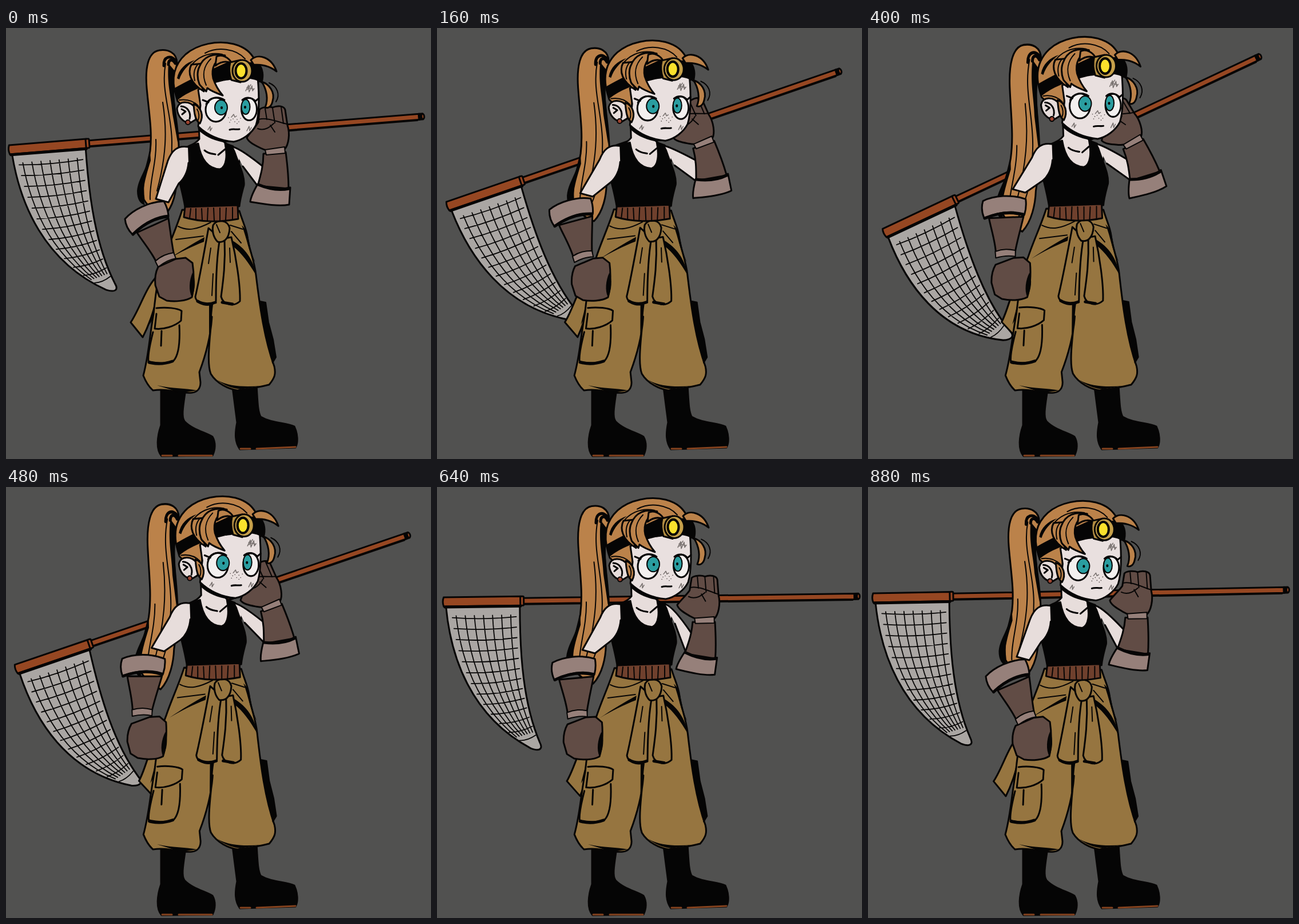
These frames come from a looping animation (743x754 px, 0.96 s). An HTML page:

```html
<!DOCTYPE html>
<html lang="en">
<head>
<meta charset="utf-8">
<title>Explorer with a net</title>
<style>
html, body { margin: 0; width: 100%; height: 100%; overflow: hidden; background: #515150; }
svg { display: block; width: 743px; height: 754px; stroke: #060505; stroke-width: 3; stroke-linejoin: round; stroke-linecap: round; fill: none; }
.hair { fill: #bb824a; }
.skin { fill: #e7dddb; }
.face { fill: #e9e0df; }
.cloth { fill: #967540; }
.glove { fill: #614c45; }
.cuff { fill: #96807a; }
.wood { fill: #964722; }
.ink { fill: #050505; }
.thin { stroke-width: 2; }
.fat { stroke-width: 5; }
.solid { fill: #050505; stroke: none; }
.smudge { stroke: #77706e; stroke-width: 1.5; }
</style>
</head>
<body>
<svg viewBox="0 0 743 754">
  <g id="pole">
    <g id="net">
      <path fill="#aaa6a3" d="M5 9C12 95 45 200 150 258C165 264 172 260 166 248C138 180 133 95 134 9Z"/>
      <path id="mesh" stroke-width="1.8"/>
    </g>
    <path class="wood" d="M138 -5L720 -5Q727 0 720 5L138 5Z"/>
    <path d="M140 6H716"/>
    <path class="wood" d="M1 -8L136 -8V8H1Q-2 0 1 -8Z"/>
    <path class="fat" d="M3 9H135"/>
    <rect class="wood" x="135" y="-8" width="6" height="16" rx="2"/>
    <path class="ink" d="M719 -5H726V5H719Z"/>
    <ellipse class="wood" cx="726" cy="0" rx="2.5" ry="4.5"/>
  </g>

  <g id="tail">
    <path class="hair" d="M299 62C299 42 282 37 268 39C248 42 243 70 246 105C250 150 256 180 252 215C247 245 236 262 241 300C250 315 265 324 277 328C293 312 298 285 298 265C302 240 302 220 302 205C300 160 290 130 293 95Z"/>
    <path class="solid" d="M252 215C246 250 231 262 229 285C229 300 235 308 243 310C237 290 241 270 253 232Z"/>
    <path class="solid" d="M284 62C281 100 289 120 291 150L300 200C302 160 289 120 295 75Z"/>
    <path class="thin" d="M279 62C270 110 290 150 290 200S285 270 270 304M262 195C264 235 250 270 252 300M274 130C282 180 280 225 264 285"/>
    <path class="fat" d="M276 66C275 50 288 46 297 58M284 64C284 55 291 53 296 62"/>
  </g>

  <g class="ink">
    <path d="M271 632L314 632C310 660 306 680 312 688C325 702 350 708 361 715C367 725 366 738 361 748L272 749C262 738 264 715 271 695Z"/>
    <path d="M396 628L438 625C440 655 440 670 445 680C465 692 490 690 504 697C510 710 511 725 506 734L409 737C400 725 400 710 404 690Z"/>
    <path stroke="#85431f" d="M273 748L290 748M302 748L360 748M410 736L427 736M438 736L506 733"/>
  </g>

  <g id="lower">
    <path id="flap" class="cloth" d="M268 430C245 450 235 490 218 515L239 541C250 520 256 500 262 480Z"/>
    <path class="solid" d="M251 519L261 478L263 498Z"/>
    <path class="cloth" d="M308 318C300 345 286 375 278 400C266 430 262 460 258 500C250 545 250 570 240 608C244 618 250 628 257 634C285 630 300 640 325 638C335 637 340 630 340 620L338 602C350 570 358 540 360 505C354 560 352 590 358 605C368 622 390 632 405 634C430 630 445 628 460 624C470 612 472 605 469 592C452 545 444 490 437 432C434 405 424 385 422 365C420 350 414 340 408 320Z"/>
    <path class="ink thin" d="M444 478L454 480L459 515L467 545L472 576L466 586C464 570 455 540 450 515Z"/>
    <path d="M263 490C280 488 300 490 307 495L306 512C295 522 275 528 260 526L263 500M257 532C250 560 248 575 249 583C265 588 285 586 293 582C304 570 304 540 303 520M272 530L271 556"/>
    <path class="fat" d="M250 585C265 589 280 587 291 583"/>
    <path class="solid" d="M355 484L362 484C359 505 360 525 355 536ZM264 625C290 631 315 630 334 634L302 639C290 632 278 630 264 625ZM370 616C390 628 420 628 446 626L410 632C392 630 380 624 370 616Z"/>
    <path class="solid" d="M283 405C305 390 325 378 347 366L346 374C325 382 305 392 283 405ZM396 372C418 385 432 404 438 434C424 410 412 394 397 382ZM412 345C428 360 422 380 436 410C424 394 422 370 412 345Z"/>
    <path class="thin" d="M301 347C318 356 335 352 358 340M297 370L345 364M392 345L414 352M394 356L411 376"/>
    <path class="cloth" d="M354 350C345 400 338 440 331 470C332 484 358 490 367 478C367 440 368 400 374 368Z"/>
    <path class="cloth" d="M382 368C384 410 380 440 376 470C380 485 398 488 409 478C410 450 402 400 394 366Z"/>
    <path class="cloth" d="M362 345C370 333 388 336 391 350C390 370 380 376 370 374C362 366 360 354 362 345Z"/>
    <path class="thin" d="M368 344L374 358M358 385L354 412M362 430L360 468M391 385L392 410"/>
    <path class="fat" d="M335 478C345 484 355 484 366 480M378 480L396 483"/>
  </g>

  <g class="upper">
    <path class="skin" d="M337 160L338 194C332 202 325 204 314 209L320 270H400L410 225C400 207 388 208 378 196L376 180Z"/>
    <path d="M347 214C354 220 360 220 366 221M383 212L371 222"/>
    <path class="ink" d="M317 208L336 202C340 225 350 246 374 247C386 243 387 222 383 202L397 207C402 230 418 255 416 275C412 290 409 300 408 312L313 313C310 295 306 280 303 268C318 260 322 235 317 208Z"/>
    <path fill="#6f402d" d="M313 313L405 310L406 334C375 340 340 340 311 331Z"/>
    <path class="thin" d="M323 316L321 333M332 316V334M342 316L343 336M353 315L352 337M363 315L364 337M374 315V337M385 315L384 336M396 314V334"/>
  </g>

  <path id="leftArm" class="skin"/>
  <g id="leftGlove">
    <path class="glove" d="M450 220L489 217C492 240 494 260 494 281L440 276C446 255 450 240 450 220Z"/>
    <path class="cuff" d="M440 273C460 281 480 283 497 279L495 309C475 313 445 307 427 304C428 295 436 280 440 273Z"/>
    <path class="fat" d="M441 274C460 282 480 284 495 281"/>
    <path class="glove" d="M443 143C447 138 460 137 466 139C475 135 486 136 488 143L492 170C497 185 494 205 487 212C470 218 455 215 445 210C435 205 424 200 421 192C425 185 435 175 441 165Z"/>
    <path class="thin" d="M453 141L456 160M466 140L470 166M481 138L485 167M442 160C455 155 480 166 491 168M440 176C450 180 460 175 468 167M462 170L470 182"/>
    <path class="cuff thin" d="M453 213L487 208L488 219L455 222Z"/>
  </g>

  <path id="rightArm" class="skin"/>
  <g id="rightFist">
    <path class="glove" d="M266 418L297 404L314 402L326 411C329 430 329 455 325 471C314 478 295 479 281 477L268 470L261 450C260 440 261 428 266 418Z"/>
    <path class="solid" d="M326 428C332 440 331 458 325 471C319 460 320 442 326 428Z"/>
  </g>
  <g id="rightGlove">
    <path class="glove" d="M229 358L284 333C288 360 290 380 294 398L264 412C255 392 240 375 229 358Z"/>
    <path class="cuff thin" d="M261 408C272 398 282 395 293 393L297 403C285 405 275 411 266 418Z"/>
    <path class="cuff" d="M208 334C222 318 250 304 276 303C280 310 283 318 284 328C262 330 240 342 221 361C214 354 209 345 208 334Z"/>
    <path class="fat" d="M222 361C240 343 262 332 283 330"/>
  </g>

  <g class="upper">
    <path class="hair" d="M297 118C288 88 294 64 314 46C335 28 370 21 398 28C420 34 428 44 434 54L446 92L340 132L337 160C326 145 310 138 300 128Z"/>
    <path class="face" d="M336 108L340 135L336 172C352 187 374 197 398 199C414 196 430 184 437 170C443 150 443 120 440 86C410 80 370 88 336 108Z"/>
    <path class="solid" d="M335 170C352 187 374 196 398 199L380 200C360 196 345 188 336 178Z"/>
    <path class="skin" d="M331 140C322 127 302 126 299 141C300 155 310 166 322 166L332 160Z"/>
    <path d="M306 137C317 137 324 148 321 159M307 142L314 146L308 151"/>
    <circle cx="318" cy="165" r="4" fill="#9e4430" class="thin"/>
    <path class="hair" d="M328 133C342 138 346 154 339 167C331 162 329 150 328 133Z"/>
    <path class="thin" d="M303 126C316 124 328 128 336 136M334 142C338 148 338 156 336 161"/>

    <ellipse cx="367" cy="143" rx="18" ry="21" fill="#f3f0ef"/>
    <ellipse cx="425" cy="142" rx="13.5" ry="19.5" fill="#f3f0ef"/>
    <g fill="#2a9da0" class="thin">
      <ellipse cx="376" cy="139" rx="11" ry="13"/>
      <ellipse cx="419" cy="138" rx="7.5" ry="13"/>
    </g>
    <path stroke-width="4" d="M377 139v1M418 138v1"/>
    <path d="M344 126L354 130M350 133C355 122 370 118 382 126M413 126C420 120 430 121 436 128L442 123"/>
    <path d="M391 178C397 176 402 178 408 177"/>
    <path stroke="#4a4240" stroke-width="1.6" d="M389 157h0M393 161h0M391 165h0M397 159h0M400 164h0M404 160h0M407 164h0M410 158h0M404 167h0"/>
    <path class="smudge" d="M419 110L424 100L425 112L430 101L431 110L434 106M421 104L433 107M422 108L428 99M353 178L357 172L357 180L360 175M421 180L425 172L426 180L429 174M394 156L398 151L400 156L403 154"/>

    <path class="ink" d="M296 106C320 92 350 78 390 60L440 62C450 70 450 85 447 95C430 82 405 88 380 91C350 98 320 108 300 124Z"/>
    <path class="hair" d="M324 64C317 78 322 97 346 111C338 95 337 80 346 62Z"/>
    <path class="hair" d="M338 68C345 50 362 43 383 48C366 54 358 70 362 88C366 100 372 110 379 118C368 114 358 110 352 105L350 111C346 106 340 102 338 98C334 88 334 76 338 68Z"/>
    <path class="hair" d="M368 50C378 45 390 52 395 62C384 56 374 60 366 66Z"/>
    <path class="thin" d="M350 100C342 82 346 66 358 54M330 92C327 80 330 70 335 64M322 68C332 53 352 41 378 46M348 44C370 32 402 36 418 54"/>
    <path class="solid" d="M299 88C302 72 314 61 330 56C318 65 308 75 303 90Z"/>
    <path class="hair" d="M428 56C440 44 464 50 473 76C460 66 448 64 433 64Z"/>
    <path class="hair" d="M447 94C460 98 471 112 466 128C464 138 458 141 453 139C459 125 456 108 447 94Z"/>
    <path class="thin" d="M460 96C474 102 480 116 472 129"/>

    <path fill="#b28d42" d="M392 60L410 56V95L394 91Q388 75 392 60Z"/>
    <ellipse cx="413" cy="75" rx="17" ry="19" fill="#c6a04a"/>
    <ellipse cx="411" cy="75" rx="9.5" ry="13" fill="#fae12c" stroke-width="4"/>
  </g>
</svg>
<script>
const STEP = 80, STEPS = 12;
// Each track holds the value at step 0, then at steps 1, 3, 5, 7, 9 and 11.
const tracks = {
  poleX: [5, 8, 28, 28, 7, 16, 8],
  poleY: [213, 264, 352, 359, 264, 155, 194],
  poleTurn: [-4.6, -11.9, -24.8, -25.2, -10.4, 6.1, -1.1],
  netLag: [0, 0, .1, .16, .02, 0, 0],
  rise: [0, .15, .6, 1, .75, .4, .1],
  cuffX: [246, 239, 231, 237, 239, 238, 244],
  cuffY: [332, 328, 316, 315, 315, 322, 330],
  cuffTurn: [0, 3, 16, 22, 25, 12, 1],
  fistX: [0, -12, -38.5, -44.5, -48.5, -27, -8],
  handX: [471, 468, 466, 464, 466, 470, 471],
  handY: [216, 209, 196, 200, 219, 244, 226],
  handTurn: [0, -8.4, -21, -22.5, -6, 11, 4]
};

// Known steps are read directly; the even ones lie on a cubic through their neighbours.
function valueAt(track, step) {
  const odd = k => track[((k + STEPS) % STEPS + 1) / 2];
  if (step === 0) return track[0];
  if (step % 2) return odd(step);
  return (9 * (odd(step - 1) + odd(step + 1)) - odd(step - 3) - odd(step + 3)) / 16;
}

const el = id => document.getElementById(id);
const move = (node, transform) => node.setAttribute("transform", transform);
const matrix = (...m) => `matrix(${m})`;
const mix = (a, b, u) => a.map((v, i) => v + (b[i] - v) * u);

function bezier(p, t) {
  const s = 1 - t, w = [s * s * s, 3 * s * s * t, 3 * s * t * t, t * t * t];
  return [0, 1].map(axis => w.reduce((sum, k, i) => sum + k * p[2 * i + axis], 0));
}

function buildMesh() {
  const left = [5, 9, 12, 95, 45, 200, 150, 258];
  const right = [134, 9, 133, 95, 138, 180, 166, 250];
  let d = "";
  for (let i = 1; i < 8; i++) {
    const edge = mix(left, right, i / 8);
    for (let t = .06; t < .96; t += .06) d += (t > .06 ? "L" : "M") + bezier(edge, t);
  }
  for (let j = 1; j < 14; j++) {
    const a = bezier(left, j / 14), b = bezier(right, j / 14);
    const [x, y] = mix(a, b, .5);
    d += `M${mix(a, b, .07)}Q${x},${y + 5} ${mix(a, b, .95)}`;
  }
  el("mesh").setAttribute("d", d);
}

function pose(step) {
  const p = {};
  for (const name in tracks) p[name] = valueAt(tracks[name], step);
  const b = p.rise;

  move(el("pole"), `translate(${p.poleX} ${p.poleY}) rotate(${p.poleTurn})`);
  move(el("net"), matrix(1, 0, -p.netLag, 1, 0, 0));
  move(el("tail"), matrix(1, 0, -.04 * b, 1 + .13 * b, 6 * b, -14.6 * b));
  move(el("lower"), matrix(1, 0, -.0113 * b, 1 + .0065 * b, 7.2 * b, -4.1 * b));
  move(el("flap"), matrix(1, 0, .15 * b, 1, -63 * b, 0));
  for (const node of document.querySelectorAll(".upper"))
    move(node, matrix(1, 0, 0, 1 + .0276 * b, 3.5 * b, -10.55 * b));

  move(el("leftGlove"), `translate(${p.handX} ${p.handY}) rotate(${p.handTurn}) translate(-471 -216)`);
  move(el("rightGlove"), `translate(${p.cuffX} ${p.cuffY}) rotate(${p.cuffTurn}) translate(-246 -332)`);
  move(el("rightFist"), `translate(${p.fistX} ${-2 * b}) rotate(${p.cuffTurn / 6} 295 440)`);

  // Arms join points on the torso to points on the gloves.
  const turn = p.handTurn * Math.PI / 180, sin = Math.sin(turn), cos = Math.cos(turn);
  const torso = (x, y) => `${x + 3.5 * b} ${y - 5 * b} `;
  const hand = (x, y) => `${p.handX + x * cos - y * sin} ${p.handY + x * sin + y * cos} `;
  const cuff = (x, y) => `${p.cuffX + x} ${p.cuffY + y} `;
  el("leftArm").setAttribute("d", "M" + torso(397, 208) + "Q" + torso(412, 212) +
    hand(-16, 31) + "L" + hand(-23, 71) + "L" + torso(414, 242));
  el("rightArm").setAttribute("d", "M" + torso(318, 208) + "C" + torso(300, 205) + torso(290, 214) + torso(283, 232) +
    "L" + cuff(16, -33) + "L" + cuff(38, -27) + "L" + torso(302, 272) +
    "C" + torso(312, 264) + torso(318, 250) + torso(319, 236));
}

function tick() {
  pose(Math.floor(performance.now() / STEP) % STEPS);
  requestAnimationFrame(tick);
}

buildMesh();
tick();
</script>
</body>
</html>
```
